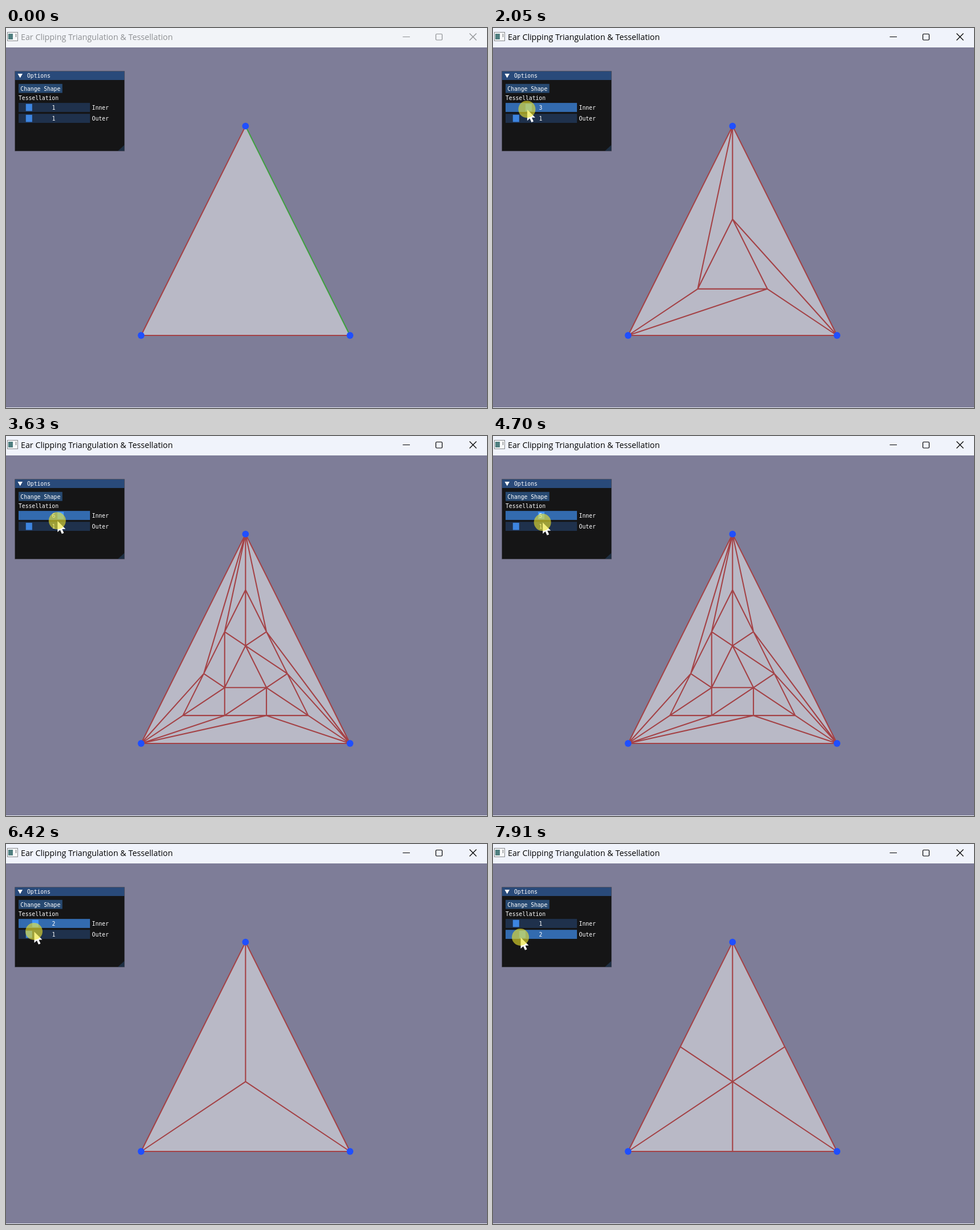
An HTML page with a canvas that plays this animation: 842 px wide and 665 px high, repeating every 8 s.

```html
<!DOCTYPE html>
<html lang="en">
<head>
<meta charset="utf-8">
<title>Ear Clipping Triangulation &amp; Tessellation</title>
<style>
html, body { margin: 0; width: 100%; height: 100%; overflow: hidden; background: #7e7d98; }
canvas { display: block; }
</style>
</head>
<body>
<canvas id="stage" width="842" height="665"></canvas>
<script>
const ctx = document.getElementById('stage').getContext('2d');
const LOOP = 8000;
const MESH_DELAY = 65;
const ENTER = 150, INNER_DOWN = 1100, INNER_UP = 6800, OUTER_DOWN = 7300;
const RED = '#a44246', GREEN = '#3fa040', BLUE = '#1f4fff';

// Each move eases the pointer from where it rests to a new place
const entry = { x: 750, y: 609 };
const moves = [
  { from: ENTER, to: 570, x: 42, y: 131, power: 2 },
  { from: 760, to: 900, x: 44, y: 139 },
  { from: 1250, to: 3800, x: 93, y: 149 },
  { from: 4250, to: 4450, x: 87, y: 151 },
  { from: 4690, to: 6420, x: 49, y: 153, power: 1.6 },
  { from: 6420, to: 6650, x: 42, y: 153 },
  { from: 6900, to: 7170, x: 44, y: 163 },
  { from: OUTER_DOWN, to: 7500, x: 48, y: 163 }
];

function pointerAt(t) {
  let { x, y } = entry;
  for (const { from, to, x: endX, y: endY, power = 1 } of moves) {
    const u = Math.max(0, Math.min(1, (t - from) / (to - from)));
    const eased = 1 - (1 - u) ** power;
    x += (endX - x) * eased;
    y += (endY - y) * eased;
  }
  return { x, y };
}

const sliderValue = x => Math.max(0, Math.min(10, Math.round((x - 28.4) / 11.1)));
const innerAt = t => t < INNER_DOWN ? 1 : sliderValue(pointerAt(Math.min(t, INNER_UP)).x);
const outerAt = t => t < OUTER_DOWN ? 1 : sliderValue(pointerAt(t).x);
const draggingInner = t => t >= INNER_DOWN && t < INNER_UP;
const draggingOuter = t => t >= OUTER_DOWN;

function rect(x, y, w, h, color) {
  ctx.fillStyle = color;
  ctx.fillRect(x, y, w, h);
}

function polygon(points, color) {
  ctx.beginPath();
  points.forEach(([x, y]) => ctx.lineTo(x, y));
  ctx.closePath();
  ctx.fillStyle = color;
  ctx.fill();
}

function disc(x, y, r, color) {
  ctx.beginPath();
  ctx.arc(x, y, r, 0, 2 * Math.PI);
  ctx.fillStyle = color;
  ctx.fill();
}

function lines(pairs, color, width) {
  ctx.beginPath();
  for (const [a, b] of pairs) {
    ctx.moveTo(...a);
    ctx.lineTo(...b);
  }
  ctx.strokeStyle = color;
  ctx.lineWidth = width;
  ctx.stroke();
}

function label(text, x, y, align = 'left') {
  ctx.font = '9.7px "DejaVu Sans Mono", monospace';
  ctx.textAlign = align;
  ctx.fillStyle = '#fff';
  ctx.fillText(text, x, y);
}

// Triangle mesh: concentric rings stitched side by side
const corners = [[419.3, 171.6], [236.5, 538], [602.2, 538]];
const center = [0, 1].map(k => corners.reduce((sum, c) => sum + c[k], 0) / 3);
const mix = (a, b, u) => a.map((v, k) => v + (b[k] - v) * u);

function ringSide(side, scale, segments) {
  const a = mix(center, corners[side], scale);
  const b = mix(center, corners[(side + 1) % 3], scale);
  return Array.from({ length: segments + 1 }, (_, i) => mix(a, b, segments ? i / segments : 0));
}

function stitch(p, q) {
  if (q.length === 1) return p.map(a => [a, q[0]]);
  const last = q.length - 1;
  if (p.length === 2) {
    const turn = Math.ceil(last / 2);
    return [...q.map((b, j) => [p[j <= turn ? 0 : 1], b]), [p[1], q[turn]]];
  }
  const edges = [[p[0], q[0]], [p[last + 2], q[last]]];
  q.forEach((b, i) => {
    edges.push([p[i + 1], b]);
    if (i < last) edges.push(i < last / 2 ? [p[i + 1], q[i + 1]] : [p[i + 2], b]);
  });
  return edges;
}

function meshEdges(inner, outer) {
  const n = outer > 1 ? Math.max(2, inner) : inner;
  const edges = [];
  for (let side = 0; side < 3; side++) {
    let ring = ringSide(side, 1, outer);
    edges.push([ring[0], ring[outer]]);
    for (let m = n - 2; m >= 0; m -= 2) {
      const next = ringSide(side, m / n, m);
      edges.push(...stitch(ring, next), [next[0], next[m]]);
      ring = next;
    }
  }
  return edges;
}

function drawShape(inner, outer) {
  const edges = meshEdges(inner, outer);
  const closing = inner <= 1 && outer <= 1 ? edges.splice(2) : [];
  polygon(corners, '#b9b9c6');
  lines(edges, RED, 2.1);
  lines(closing, GREEN, 2.1);
  corners.forEach(([x, y]) => disc(x, y, 5.9, BLUE));
}

function drawTitleBar(active) {
  const ink = active ? '#000' : '#8e9093';
  rect(0, 0, 842, 34, active ? '#f0f3fb' : '#f2f4f8');
  rect(0, 664, 842, 1, '#eceef4');

  rect(2, 7, 19, 16, '#85888c');
  rect(3, 8, 17, 14, '#f7f8f9');
  rect(4, 10, 8, 10, '#4f7f80');
  rect(17, 10, 1, 6, '#66696d');

  ctx.font = '14.28px "Open Sans", "Noto Sans", sans-serif';
  ctx.textAlign = 'left';
  ctx.fillStyle = ink;
  ctx.fillText('Ear Clipping Triangulation & Tessellation', 26, 21);

  lines([[[694.5, 15.5], [707, 15.5]]], ink, 1);
  lines([[[811.5, 9.5], [823.5, 21.5]], [[823.5, 9.5], [811.5, 21.5]]], ink, 1.3);
  ctx.beginPath();
  ctx.roundRect(752.5, 10.5, 11, 10.5, 1.5);
  ctx.lineWidth = 1.2;
  ctx.stroke();
}

function drawSlider(y, name, value, pressed, hovered) {
  rect(22, y, 125, 15.8, pressed ? '#336baf' : hovered ? '#274971' : '#1f314c');
  rect(23.7 + 11.06 * value, y + 1.7, 11.06, 12.5, pressed ? '#4296fa' : '#3d85e0');
  label(value, 83.5, y + 11.7, 'center');
  label(name, 150.6, y + 11.7);
}

function drawPanel(t, pointer) {
  const over = y => !draggingInner(t) && pointer.x >= 22 && pointer.x < 147
    && pointer.y >= y && pointer.y < y + 16;

  rect(15.3, 75.3, 192.4, 140.3, '#44444f');
  rect(16, 76, 191, 139, '#151516');
  rect(16, 76, 191, 15, '#294a7a');
  polygon([[20.5, 80], [29, 80], [24.7, 87.5]], '#fff');
  label('Options', 37, 87);
  rect(22, 97.8, 76.7, 15.8, '#274971');
  label('Change Shape', 25.3, 109.5);
  label('Tessellation', 22, 126);
  drawSlider(131.1, 'Inner', innerAt(t), draggingInner(t), over(131));
  drawSlider(150.2, 'Outer', outerAt(t), draggingOuter(t), over(150));
  polygon([[207, 205], [207, 215], [196, 215]], '#1e2f44');
}

const arrow = [[0, 0], [0, 19.5], [4.5, 15.5], [7.5, 22.3], [11, 20.8], [8, 14.2], [14, 14]];

function drawPointer(t, { x, y }) {
  if (t < ENTER) return;
  polygon(arrow.map(([dx, dy]) => [x + dx + 0.5, y + dy + 0.5]), '#fff');
  if (draggingInner(t) || draggingOuter(t)) disc(x, y, 15, 'rgba(235,228,45,.62)');
}

function draw(t) {
  const pointer = pointerAt(t);
  rect(0, 0, 842, 665, '#7e7d98');
  drawTitleBar(t >= INNER_DOWN);
  drawShape(innerAt(t - MESH_DELAY), outerAt(t - MESH_DELAY));
  drawPanel(t, pointer);
  drawPointer(t, pointer);
}

const start = performance.now();
function tick() {
  draw((performance.now() - start) % LOOP);
  requestAnimationFrame(tick);
}
tick();
</script>
</body>
</html>
```
